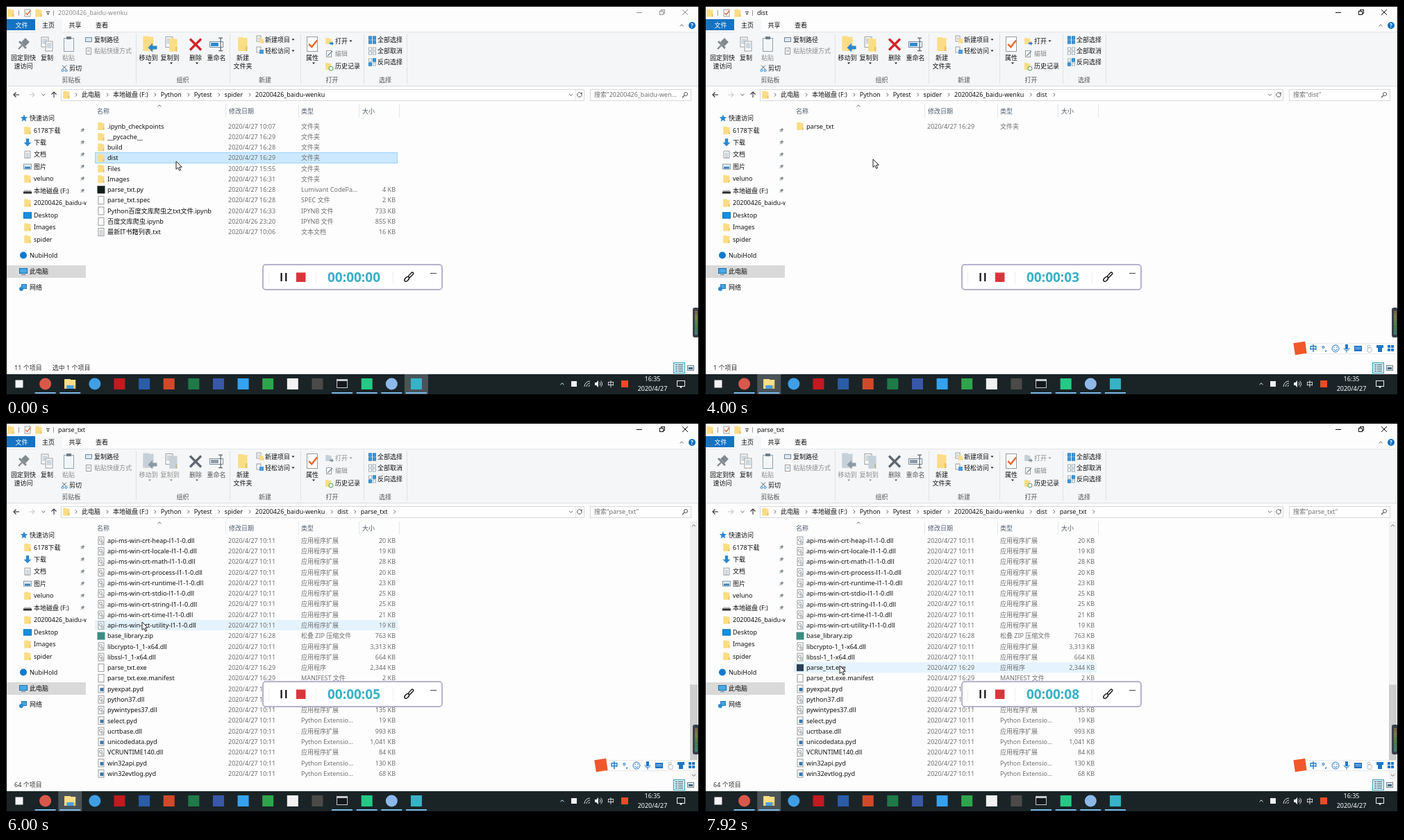
Animation of 998 by 561 pixels, one loop 8 s. Source, as an HTML page with a canvas:

```html
<!DOCTYPE html>
<html lang="zh-CN">
<head>
<meta charset="utf-8">
<title>Folder window</title>
<style>
html, body { margin: 0; width: 100%; height: 100%; overflow: hidden; background: #fff; }
canvas { display: block; }
</style>
</head>
<body>
<canvas id="stage" width="998" height="561"></canvas>
<script>
const c = document.getElementById('stage').getContext('2d');
const LOOP = 8000, ROW = 15.27, TOP = 173.3, MAX = 41.24;
const FAMILY = '"Noto Sans", "Open Sans", "Noto Sans CJK SC", "Noto Sans CJK JP", sans-serif';
const INK = '#111', GREY = '#6f6f6f', PALE = '#8d8d8d', BLUE = '#2b88d0';
const DOWN = Math.PI / 2, UP = -DOWN, LEFT = Math.PI;
const clamp = v => Math.min(1, Math.max(0, v));
const times = (n, fn) => { for (let i = 0; i < n; i++) fn(i); };

// Drawing helpers
function rect(x, y, w, h, fill, line) {
  if (fill) { c.fillStyle = fill; c.fillRect(x, y, w, h); }
  if (line) { c.strokeStyle = line; c.lineWidth = 1; c.strokeRect(x + .5, y + .5, w - 1, h - 1); }
}
function text(s, x, y, color = INK, align = 'left', size = 9, weight = 400) {
  c.font = `${weight} ${size}px ${FAMILY}`;
  c.textAlign = align;
  c.fillStyle = color;
  c.fillText(s, x, y + size * .36);
  return c.measureText(s).width;
}
function trace(pts) {
  c.beginPath();
  for (let i = 0; i < pts.length; i += 2) c.lineTo(pts[i], pts[i + 1]);
}
function path(color, width, ...pts) {
  trace(pts);
  c.strokeStyle = color;
  c.lineWidth = width;
  c.stroke();
}
function poly(color, ...pts) {
  trace(pts);
  c.closePath();
  c.fillStyle = color;
  c.fill();
}
function disc(x, y, r, fill, line, from = 0, to = 7) {
  c.beginPath();
  c.arc(x, y, r, from, to);
  if (fill) { c.fillStyle = fill; c.fill(); }
  if (line) { c.strokeStyle = line; c.lineWidth = 1; c.stroke(); }
}
function turned(x, y, angle, fn) {
  c.save();
  c.translate(x, y);
  c.rotate(angle);
  fn();
  c.restore();
}
const square = (x, y, s, color) => rect(x - s / 2, y - s / 2, s, s, color);
const caret = (x, y, color) => poly(color, x - 2, y - 1, x + 2, y - 1, x, y + 1.3);
const chevron = (x, y, angle = 0, color = '#666') =>
  turned(x, y, angle, () => path(color, 1, -1.2, -2.5, 1.2, 0, -1.2, 2.5));
const arrow = (x, y, angle, color) => turned(x, y, angle, () => {
  path(color, 1.1, -4, 0, 4, 0);
  path(color, 1.1, .5, -3.5, 4, 0, .5, 3.5);
});
const fatArrow = (x, y, r, angle, color) => turned(x, y, angle, () =>
  poly(color, r, 0, 0, -r, 0, -r * .4, -r, -r * .4, -r, r * .4, 0, r * .4, 0, r));
function cross(x, y, r, color, width = 1) {
  path(color, width, x - r, y - r, x + r, y + r);
  path(color, width, x + r, y - r, x - r, y + r);
}
const tick = (x, y, r, color) => path(color, r * .35, x - r * .7, y, x - r * .1, y + r * .6, x + r, y - r * .8);

// Pictograms
function folder(x, y, w = 9, h = 11, color = '#fbdd86') {
  rect(x - w / 2, y - h / 2, w * .55, h, color);
  rect(x - w / 2, y - h / 2 + 1, w, h - 1, color);
  rect(x + w * .3, y + h * .15, w * .2, h * .35, 'rgba(190,130,0,.3)');
}
function page(x, y, w = 8, h = 10, lines = 0) {
  rect(x - w / 2, y - h / 2, w, h, '#fff', '#9a9a9a');
  times(lines, i => rect(x - w / 2 + 2, y - h / 2 + 3 + i * 2, w - 4, 1, '#9fb2c0'));
}
function pin(x, y, k) {
  turned(x, y, Math.PI / 4, () => {
    rect(-1.5 * k, -3 * k, 3 * k, 3 * k, '#808a91');
    rect(-2.5 * k, 0, 5 * k, k, '#808a91');
    rect(-.4 * k, k, .8 * k, 2.5 * k, '#808a91');
  });
}
function star(x, y, r) {
  const pts = [];
  times(10, i => {
    const a = UP + i * Math.PI / 5, d = i % 2 ? r * .45 : r;
    pts.push(x + d * Math.cos(a), y + d * Math.sin(a));
  });
  poly(BLUE, ...pts);
}
function tiles(x, y, on) {
  times(4, i => rect(x - 5 + (i % 2) * 6, y - 5 + (i >> 1) * 6, 5, 5, on(i) ? '#3f9be0' : '#fff', on(i) ? '#2c82c4' : '#9cadb9'));
}

// Folder contents
const DLL = '应用程序扩展', PYD = 'Python Extensio...', DIR = '文件夹';
const item = (name, time, type, size, icon = 'file') => ({ name, date: '2020/4/' + time, type, size: size ? size + ' KB' : '', icon });
const dir = (name, time) => item(name, time, DIR, '', 'dir');
const libs = (s, ext, type) => s.split(' ').map(p => {
  const [n, size] = p.split(':');
  return item(n + '.' + ext, '27 10:11', type, size || 19, ext);
});
const apis = (group, s) => libs(s.replace(/[a-z]+/g, n => `api-ms-win-${group}-${n}-l1-1-0`)
  .replace(/-l1-1-0(\d)/g, (_, v) => ['-l1-1-1', '-l1-2-0', '-l2-1-0'][v]), 'dll', DLL);

const project = [
  dir('.ipynb_checkpoints', '27 10:07'),
  dir('__pycache__', '27 16:29'),
  dir('build', '27 16:28'),
  dir('dist', '27 16:29'),
  dir('Files', '27 15:55'),
  dir('Images', '27 16:31'),
  item('parse_txt.py', '27 16:28', 'Lumivant CodePa...', 4, 'code'),
  item('parse_txt.spec', '27 16:28', 'SPEC 文件', 2),
  item('Python百度文库爬虫之txt文件.ipynb', '27 16:33', 'IPYNB 文件', 733),
  item('百度文库爬虫.ipynb', '26 23:20', 'IPYNB 文件', 855),
  item('最新IT书籍列表.txt', '27 10:06', '文本文档', 16, 'txt')
];
const dist = [dir('parse_txt', '27 16:29')];
const build = [
  ...['certifi', 'cryptography', 'cryptography-2.8-py3.7.egg-info'].map(n => dir(n, '27 16:29')),
  ...libs('_bz2:80 _cffi_backend.cp37-win_amd64:177 _ctypes:124 _decimal:256 _hashlib:31 _lzma:244 _queue:20 _socket:67 _ssl:113', 'pyd', PYD),
  ...apis('core', 'console datetime debug errorhandling file:22 file1 file2 handle heap interlocked libraryloader:20 localization memory ' +
    'namedpipe processenvironment processthreads processthreads0 profile rtlsupport string synch:21 synch1 sysinfo:20 timezone util'),
  ...apis('crt', 'conio:20 convert:23 environment filesystem:21 heap:20 locale math:28 process:20 runtime:23 stdio:25 string:25 time:21 utility'),
  item('base_library.zip', '27 16:28', '松叠 ZIP 压缩文件', 763, 'zip'),
  ...libs('libcrypto-1_1-x64:3,313 libssl-1_1-x64:664', 'dll', DLL),
  item('parse_txt.exe', '27 16:29', '应用程序', '2,344', 'exe'),
  item('parse_txt.exe.manifest', '27 16:29', 'MANIFEST 文件', 2),
  ...libs('pyexpat:188', 'pyd', PYD),
  ...libs('python37:3,661 pywintypes37:135', 'dll', DLL),
  ...libs('select', 'pyd', PYD),
  ...libs('ucrtbase:993', 'dll', DLL),
  ...libs('unicodedata:1,041', 'pyd', PYD),
  ...libs('VCRUNTIME140:84', 'dll', DLL),
  ...libs('win32api:130 win32evtlog:68', 'pyd', PYD)
];

// Motion
function glide(t, from, to) {
  const k = clamp((t - from) / (to - from));
  return k * k * (3 - 2 * k);
}
function pointer(t) {
  const drift = glide(t, 170, 670), reach = glide(t, 4420, 4830), drop = glide(t, 5250, 5550), aim = glide(t, 6920, 7750);
  return [245 - 3 * drift - 32 * reach - 14 * drop - 2 * aim, 224 - 3 * drift - 55 * reach + 121 * drop + 63 * aim];
}
// The wheel moves three rows a notch: down to the end, back a little, down again
function scrollRows(t) {
  const notch = rows => 3 * Math.round(rows / 3);
  const back = notch(9 * clamp(1.6 - Math.abs(t - 6460) / 200));
  return Math.min(MAX, notch(45 * clamp((t - 5620) / 380))) - back;
}
function stateAt(t) {
  const files = t < 3667 ? project : t < 5400 ? dist : build;
  const [x, y] = pointer(t);
  return {
    t, files, x, y,
    trail: ['此电脑', '本地磁盘 (F:)', 'Python', 'Pytest', 'spider', '20200426_baidu-wenku', 'dist', 'parse_txt']
      .slice(0, files === project ? 6 : files === dist ? 7 : 8),
    scroll: scrollRows(t) * ROW,
    picked: files === project ? 3 : files === dist && t >= 4950 ? 0 : -1,
    active: t >= 3500,
    secs: Math.max(0, Math.floor((t - 680) / 895))
  };
}

function titleBar(s) {
  const tone = s.active ? INK : '#8f8f8f';
  folder(7, 10);
  page(31, 10, 9, 11);
  tick(31, 10, 4, '#e0662c');
  folder(47, 10);
  rect(58, 8, 5, 1, '#333');
  caret(60.5, 11.5, '#333');
  rect(18, 6, 1, 8, '#999');
  rect(68, 6, 1, 8, '#999');
  text(s.trail.at(-1), 75, 10, tone);
  rect(908, 9, 8, 1, tone);
  rect(943, 5, 6, 6, null, tone);
  rect(941, 7, 6, 6, '#fdfdfd', tone);
  cross(978, 9, 4, tone);

  rect(1, 37, 996, 78, '#f5f6f7');
  rect(1, 115, 996, 1, '#dcdddf');
  rect(1, 37, 996, 1, '#e4e5e7');
  rect(1, 19, 41, 16, '#1673c1');
  rect(42, 19, 39, 19, '#f5f6f7');
  ['文件', '主页', '共享', '查看'].forEach((n, i) => text(n, 22.5 + i * 38.5, 27.5, i ? INK : '#fff', 'center'));
  chevron(973, 28, UP);
  disc(988, 28, 5, '#0f6fc0');
  text('?', 988, 28, '#fff', 'center', 8, 700);
}

function ribbon(none) {
  const soft = none ? PALE : INK, tint = none ? '#8a9aa7' : BLUE, paper = none ? '#c6d0d8' : undefined;
  const big = (s, x, color = INK, menu) => {
    s.split('|').forEach((line, i) => text(line, x, 75 + i * 12, color, 'center'));
    if (menu) caret(x + 2, 82.5, color);
  };
  const small = (s, x, y, color = INK, menu) => {
    const w = text(s, x, y, color);
    if (menu) caret(x + w + 4.5, y, color);
  };
  pin(25, 55, 2.8);
  big('固定到快|速访问', 25);
  page(56, 52, 11, 15, 4);
  page(62, 58, 11, 15, 4);
  big('复制', 59);
  rect(83, 46, 15, 20, '#f3f6f8', '#8fa2b0');
  rect(87, 44, 7, 4, '#6e7d88');
  big('粘贴', 90, PALE);
  rect(114, 45, 10, 7, '#dce9f2', '#71889a');
  small('复制路径', 127, 48.5);
  page(119, 65, 8, 10, 2);
  small('粘贴快捷方式', 127, 64.5, PALE);
  cross(84, 88.5, 3, '#53636e');
  disc(81.5, 93, 1.5, null, BLUE);
  disc(86.5, 93, 1.5, null, BLUE);
  small('剪切', 91, 89.5);

  folder(205, 54, 15, 21, paper);
  fatArrow(211, 60, 6.5, LEFT, tint);
  big('移动到', 205, soft, true);
  page(235, 52, 11, 16, 4);
  folder(241, 56, 11, 19, paper);
  big('复制到', 236, soft, true);
  cross(273, 55.5, 8, none ? '#5b6670' : '#d3222a', 3.2);
  big('删除', 273, none ? '#555' : INK, true);
  rect(293, 51, 20, 9, '#fff', '#71889a');
  rect(295, 53, 11, 5, tint);
  rect(308.5, 46, 1.2, 18, '#56616a');
  rect(306, 45.5, 6, 1.2, '#56616a');
  rect(306, 64, 6, 1.2, '#56616a');
  big('重命名', 303, none ? '#555' : INK);

  folder(341, 55, 13, 20);
  big('新建|文件夹', 341);
  page(364, 47, 7, 9, 2);
  folder(368, 50, 6, 7);
  small('新建项目', 373, 48.5, INK, true);
  page(364, 63, 7, 9);
  square(368, 66, 6, '#4b9adb');
  small('轻松访问', 373, 64.5, INK, true);

  page(441, 55, 16, 22);
  tick(441, 55, 7, '#e8672a');
  big('属性', 441, INK, true);
  folder(464.5, 50.5, 8, 9, paper);
  fatArrow(469, 54, 3, 0, tint);
  small('打开', 474, 50.5, soft, true);
  page(465, 69, 8, 10);
  path('#7290a8', 1.4, 463, 72, 470, 65);
  small('编辑', 474, 69, PALE);
  folder(464, 87, 8, 10);
  disc(468, 90, 3, '#fff', '#4a9a55');
  small('历史记录', 474, 87);
  ['全部选择', '全部取消', '反向选择'].forEach((n, i) => {
    tiles(527, 48.5 + i * 16, k => i == 0 || i == 2 && (k == 1 || k == 2));
    small(n, 535, 48.5 + i * 16);
  });
  const edges = [1, 187, 322, 424, 515, 577];
  ['剪贴板', '组织', '新建', '打开', '选择'].forEach((n, i) => {
    text(n, (edges[i] + edges[i + 1]) / 2, 107, '#555', 'center');
    rect(edges[i + 1], 40, 1, 72, '#dfe1e3');
  });
}

function addressBar(s) {
  const y = 128, last = s.trail.at(-1);
  arrow(15, y, LEFT, '#333');
  arrow(37, y, 0, '#ccc');
  chevron(54, y, DOWN);
  arrow(69, y, UP, '#333');
  rect(79, 120, 754, 17, '#fff', '#d9d9d9');
  rect(820, 121, 1, 15, '#e3e3e3');
  folder(87, y);
  let x = 109;
  s.trail.forEach(n => {
    chevron(x - 8, y);
    x += text(n, x, y) + 18;
  });
  if (s.files !== project) chevron(x - 8, y);
  chevron(813.5, y, DOWN);
  disc(826, y, 3.3, null, '#555', -.4, 5);
  caret(828.5, 126, '#555');
  rect(841, 120, 146, 17, '#fff', '#d9d9d9');
  text(last.length > 18 ? `搜索"${last.slice(0, 18)}...` : `搜索"${last}"`, 847, y, GREY);
  disc(979, 127, 2.5, null, '#555');
  path('#555', 1.2, 977, 129, 974, 132);
}

function sidebar() {
  c.save();
  c.beginPath();
  c.rect(1, 140, 114.5, 370);
  c.clip();
  star(26, 162, 5.5);
  text('快速访问', 34, 161.5);
  const icons = {
    '下载': y => fatArrow(31, y, 5.5, DOWN, BLUE),
    '文档': y => page(31, y, 9, 11, 4),
    '图片': y => { rect(25, y - 4, 12, 8, '#e4f0f8', '#8a9aa6'); rect(27, y, 8, 3, '#3d83b5'); },
    '本地磁盘 (F:)': y => { rect(26, y - 1, 10, 2, '#bbb'); rect(25, y + 1, 12, 3, '#2f2f2f'); },
    'Desktop': y => rect(25, y - 4, 12, 9, '#1590e0', '#1172b8')
  };
  ['6178下载', '下载', '文档', '图片', 'veluno', '本地磁盘 (F:)', '20200426_baidu-wenku', 'Desktop', 'Images', 'spider'].forEach((n, i) => {
    const y = 179.3 + i * 17.45;
    (icons[n] || (y => folder(31, y)))(y);
    text(n, 40, y);
    if (i < 6) pin(110, y, 1);
  });
  rect(1, 374, 114, 18, '#d9d9d9');
  disc(25, 359.5, 5, '#1479cd');
  rect(19, 378, 12, 8, '#4aa8e6', '#1c6ea8');
  rect(22, 387, 6, 1, '#5c7c92');
  rect(22, 401, 8, 7, '#4aa3dc', '#2b7db5');
  disc(22, 408, 3, BLUE);
  ['NubiHold', '此电脑', '网络'].forEach((n, i) => text(n, 34, 359.5 + i * 23.2));
  c.restore();
}

function fileIcon(kind, y, t) {
  const x = 137;
  if (kind == 'dir') return folder(x, y);
  if (kind == 'code') return square(x, y, 11, '#12201a');
  if (kind == 'zip') return square(x, y, 11, '#3c8a83');
  if (kind == 'exe' && t > 6900) return square(x, y, 10, '#2b3f58');
  page(x, y, 9, 12, kind == 'txt' ? 4 : 0);
  if (kind == 'pyd') square(x + 1, y + 1, 5, '#3b76ae');
  if (kind == 'dll') { disc(x - .5, y - 1, 2, null, '#8a979f'); disc(x + 1.5, y + 2.5, 1.5, null, '#8a979f'); }
}
function clipName(s, size, room = 166) {
  c.font = `${size}px ${FAMILY}`;
  if (c.measureText(s).width <= room) return s;
  while (c.measureText(s + '...').width > room) s = s.slice(0, -1);
  return s + '...';
}

function fileList(s) {
  const columns = { '名称': 131, '修改日期': 321, '类型': 425, '大小': 513 };
  for (const n in columns) text(n, columns[n], 152, '#4f5f70');
  [316, 421, 508, 566].forEach(x => rect(x, 142, 1, 19, '#e6e6e6'));
  chevron(221, 144, UP);
  c.save();
  c.beginPath();
  c.rect(120, 162, 860, 352);
  c.clip();
  s.files.forEach((f, i) => {
    const y = TOP + i * ROW - s.scroll, top = Math.round(y - ROW / 2);
    if (y < 155 || y > 520) return;
    if (i == s.picked) rect(128, top, 436, 16, '#cce8ff', '#99d1ff');
    else if (Math.abs(s.y - y) < ROW / 2) rect(128, top, 436, 15, '#e5f3ff');
    fileIcon(f.icon, y, s.t);
    text(clipName(f.name, 9.15), 146, y, INK, 'left', 9.15);
    text(f.date, 320, y, GREY);
    text(f.type, 425, y, GREY);
    text(f.size, 561, y, GREY, 'right');
  });
  c.restore();
  if (s.files === build) {
    rect(985, 142, 11, 372, '#f0f0f0');
    rect(985, 155 + s.scroll * 345 / (64 * ROW), 11, 122, '#cdcdcd');
    chevron(990.5, 148, UP);
    chevron(990.5, 508, DOWN);
  }
  const w = text(s.files.length + ' 个项目', 12, 522, '#333');
  if (s.picked >= 0) text('选中 1 个项目', 27 + w, 522, '#333');
  rect(961, 514, 17, 16, '#cdebf3', '#3aa0b4');
  times(4, i => { rect(964, 517 + i * 3, 3, 1, '#456'); rect(968, 517 + i * 3, 7, 1, '#456'); });
  rect(981, 518, 10, 8, '#dfe9ef', '#73838e');
  rect(983, 521, 6, 3, '#41677f');
}

function recorder(secs) {
  c.beginPath();
  c.roundRect(370, 373, 258, 36, 4);
  c.fillStyle = '#fff';
  c.fill();
  c.strokeStyle = '#a19bc0';
  c.lineWidth = 1.5;
  c.stroke();
  [378, 446, 557].forEach(x => times(6, i => rect(x, 384 + i * 3, 1, 1, '#ccc')));
  rect(395.5, 385, 2.2, 12, INK);
  rect(402.2, 385, 2.2, 12, INK);
  square(424.7, 391.2, 13.5, '#d9363b');
  text('00:00:0' + secs, 501, 391.5, '#38b0c6', 'center', 19, 700);
  turned(580, 391, -.8, () => {
    c.beginPath();
    c.ellipse(-4, 0, 4, 2.4, 0, 0, 7);
    c.roundRect(0, -1.5, 9, 3, 1.5);
    c.strokeStyle = INK;
    c.lineWidth = 1.4;
    c.stroke();
  });
  rect(611, 385, 9, 1, '#444');
}

function sideGauge() {
  c.beginPath();
  c.roundRect(989, 435, 9, 43, 3);
  c.fillStyle = '#3a4148';
  c.fill();
  times(15, i => rect(992, 440 + i * 2.3, 4, 1.2, `hsl(${25 + i * 10} 45% 50%)`));
}

function inputBar() {
  const ink = '#1f76c6', y = 494, slot = i => 876 + i * 16;
  rect(864, 486, 132, 16, '#fff', '#e8eaec');
  turned(857, 493.5, -.15, () => square(0, 0, 17, '#f0582a'));
  text('中', slot(0), y, ink, 'center', 11, 700);
  text('°,', slot(1), y, ink, 'center', 11, 700);
  disc(slot(2), y, 5, null, ink);
  disc(slot(2), y, 2.6, null, ink, .2, 2.9);
  disc(slot(2) - 2, y - 2, .8, ink);
  disc(slot(2) + 2, y - 2, .8, ink);
  rect(slot(3) - 2, y - 6, 4, 7, ink);
  disc(slot(3), y - 1, 3.8, null, ink, 0, Math.PI);
  rect(slot(3) - .5, y + 3, 1, 3, ink);
  rect(slot(4) - 5, y - 4, 11, 8, ink);
  times(8, i => rect(slot(4) - 3 + (i % 4) * 2, y - 2 + (i >> 2) * 2, 1, 1, '#fff'));
  disc(slot(5), y - 3, 2, null, '#b4b8bb');
  disc(slot(5) + 1, y + 2, 3.5, null, '#b4b8bb');
  rect(slot(6) - 5, y - 5, 10, 4, ink);
  rect(slot(6) - 3, y - 5, 6, 10, ink);
  times(4, i => rect(slot(7) - 5 + (i % 2) * 5, y - 5 + (i >> 1) * 5, 4, 4, ink));
}

function taskbar(active) {
  const slot = i => 21 + i * 35.62, y = 545;
  const dot = tone => x => disc(x, y, 8.5, tone), box = tone => x => square(x, y, 16, tone);
  const explorer = x => { folder(x, y, 16, 14); rect(x - 5, y + 2, 10, 5, '#4f9fd8'); };
  const terminal = x => { rect(x - 8, y - 7, 16, 13, '#15181a', '#c5c9cb'); rect(x - 8, y - 7, 16, 3, '#c5c9cb'); };
  const apps = [x => square(x - 2, y, 11, '#f4f4f4'), dot('#d9584b'), explorer, dot('#3f9fe6'), box('#c4191f'), box('#2b5ca8'),
    box('#d04a2a'), box('#1f7a48'), box('#3a58a8'), box('#35a2f0'), box('#2ea54c'), box('#f2f2f2'), box('#4c4a48'),
    terminal, box('#25c985'), dot('#8db9ea'), box('#38b2c6')];
  rect(1, 531, 996, 29, '#1a2427');
  rect(slot(active ? 2 : 16) - 17, 531, 34, 29, '#4a5457');
  apps.forEach((app, i) => {
    app(slot(i));
    if (i == 1 || i == 2 || i > 12) rect(slot(i) - 15, 557, 30, 2, '#78b8e8');
  });
  chevron(801, y, UP, '#eee');
  square(818, y, 8, '#f0f0f0');
  times(3, i => disc(841, 549, 2 + i * 3, null, '#d5d8da', LEFT, LEFT + DOWN));
  poly('#eee', 848, 543, 850, 543, 853, 540, 853, 550, 850, 547, 848, 547);
  times(2, i => disc(853, y, 3 + i * 2.5, null, '#eee', -.9, .9));
  text('中', 871, y, '#fff', 'center', 10);
  square(891, y, 10, '#ee4b25');
  text('16:35', 931, 538, '#fff', 'center');
  text('2020/4/27', 931, 552, '#fff', 'center');
  rect(966, 540, 12, 9, null, '#eee');
  caret(972, 550, '#eee');
}

function cursor(x, y) {
  turned(x, y, 0, () => {
    poly('#fff', 0, 0, 0, 11.5, 2.7, 9, 4.7, 13.4, 6.6, 12.5, 4.7, 8.3, 8.2, 8.2);
    c.strokeStyle = '#222';
    c.lineWidth = 1;
    c.stroke();
  });
}

function draw(t) {
  const s = stateAt(t);
  rect(0, 0, 998, 561, '#fdfdfd');
  titleBar(s);
  ribbon(s.files === build);
  addressBar(s);
  sidebar();
  fileList(s);
  sideGauge();
  if (t >= 3583) inputBar();
  taskbar(s.active);
  recorder(s.secs);
  cursor(s.x, s.y);
  rect(0, 0, 998, 561, null, '#000');
}

let start;
function loop(now) {
  start ??= now;
  draw(Math.max(0, now - start) % LOOP);
  requestAnimationFrame(loop);
}
requestAnimationFrame(loop);
</script>
</body>
</html>
```
